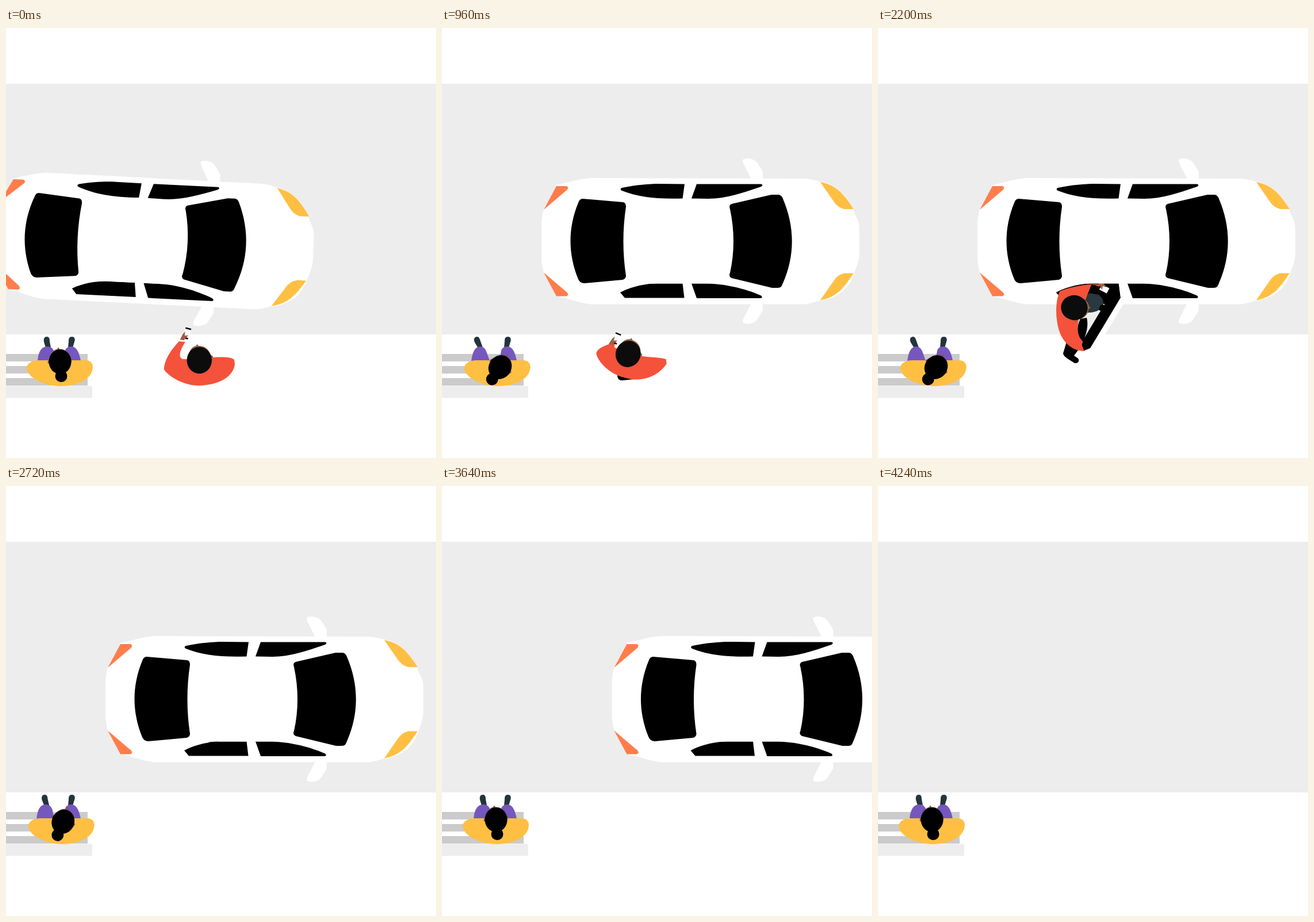
These frames come from a looping animation (748 px wide and 748 px high, 5.32 s). An HTML page:

```html
<!DOCTYPE html>
<html lang="en">
<head>
<meta charset="utf-8">
<title>Pick-up</title>
<style>
  html, body { margin: 0; width: 100%; height: 100%; overflow: hidden; background: #fff; }
  svg { display: block; width: 100vw; height: 100vh; }
</style>
</head>
<body>
<svg viewBox="0 0 748 748">
  <defs>
    <g id="side">
      <path fill="#fff" d="M510 231C510 227 515 227 520 227C530 228 534 232 537 237L545 250V263H525L511 235Z"/>
      <path fill="#ff7d4b" d="M164 316L186 275H203C207 276 207 279 204 282Z"/>
      <path fill="#ffbf43" d="M645 268C672 273 685 287 703 315H688C680 314 674 309 670 304Z"/>
    </g>
  </defs>

  <path fill="#ededed" d="M0 97H748V533H0Z"/>
  <path fill="#cbcbcb" d="M0 567H142V580H0ZM0 588H142V601H0ZM0 609H142V622H0Z"/>
  <path fill="#ededed" d="M0 622.5H148Q150 622.5 150 625V641Q150 643.5 148 643.5H0Z"/>

  <g id="woman">
    <path id="shoeL" fill="#22343c"/>
    <path fill="#22343c" d="M108 556L109 545C109 540 110 537 115 537C119 537 121 541 119 546L116 556Z"/>
    <path id="legL" fill="#7557be"/>
    <path fill="#7557be" d="M130 579C127 563 122 554 114 554C108 554 104 557 103 561L100 579Z"/>
    <path id="torso" fill="#ffbf43" d="M57 578H138C147 578 151 583 151 590C150 612 122 623 95 623C66 623 37 608 36 592C36 583 46 578 57 578Z"/>
    <g id="womanHead">
      <path fill="#8d5034" d="M-17 -8C-15 -17 -9 -21 -5 -22L-3 -25L-1 -22C8 -22 14 -18 17 -8L21 -5L19 3H-20C-23 3 -21 -3 -17 -8Z"/>
      <ellipse rx="19.5" ry="21.5"/>
      <circle cx="2" cy="25" r="10.5"/>
    </g>
  </g>

  <g class="car">
    <path fill="#fff" d="M248 261L620 262C630 263 640 266 648 268C675 272 698 300 705 324C710 333 713 340 713 350V392C713 405 708 415 704 427C695 455 675 470 645 474C635 477 625 480 618 480.5H248C232 480 210 472 190 467L164 425C161 415 160 405 160 395V348C160 335 161 325 164 315L187 273C205 269 230 261 248 261Z"/>
    <use href="#side"/>
    <use href="#side" transform="translate(0 741.5) scale(1 -1)"/>
    <path d="M232 297L302 303C306 304 307 307 307 311C301 350 301 392 307 431C307 434 305 437 301 438L235 444C229 444 226 441 224 437C206 393 206 348 224 304C226 299 228 297 232 297Z"/>
    <path d="M491 306L560 290H573C577 291 579 294 580 297C601 346 601 396 580 444C578 449 577 452 571 452H561L491 435C487 433 486 430 488 426C496 390 496 352 488 315C486 310 488 307 491 306Z"/>
    <path d="M409 271.5L405.5 296.5C360 298 328 294 300 283C297 282 297 279 300 278C325 273 345 271 365 271Z"/>
    <path d="M430 271.5H542C545 272 545 274 542 276C510 287 480 297 450 297L421 296.5Z"/>
    <path d="M421 444.5H440C480 444 515 454 541 465C545 467 544 470 541 470H430Z"/>
    <path d="M297 460C320 448 345 444 365 444.5H405.5L408.5 469.5H305Z"/>
    <path id="opening" d="M297 460C320 448 345 444 365 444.5H405.5L409 470L404 480H322Q314 479 309 473Z"/>
  </g>

  <g id="man">
    <path id="backLeg"/>
    <path id="thigh"/>
    <path id="paper" fill="#fff"/>
    <path id="pants" fill="#2a3840"/>
    <path id="shoe"/>
    <path id="body" fill="#f4523a"/>
    <g id="phone">
      <rect x="-5" y="-9" width="10" height="18" rx="2" fill="#fff"/>
      <path d="M-5 -9.5H5V-7H-5ZM-3 7.5H4V10H-3Z"/>
      <path fill="#9a6146" d="M-9 14L-7 4L-4 -2L-3 5L3 3L1 7L-2 10L-1 13Z"/>
    </g>
    <g id="manHead">
      <path fill="#9a6146" d="M-19 -9C-16 -20 -11 -24 -6 -25L-4 -28L-1 -25C9 -25 16 -20 19 -10L24 -7L21 4H-20Z"/>
      <ellipse rx="21.7" ry="23.2" fill="#0c0c0c"/>
    </g>
  </g>

  <g class="car">
    <path fill="#fff" d="M309 453C325 446 345 444.5 365 444.5H480V300H309Z"/>
    <g id="door">
      <path fill="#fff" d="M414 480H312L303 469H409Z"/>
      <path d="M409 470H308L299 463L305 455L314 452H409Z"/>
      <path id="grip" fill="#9a6146" d="M284 467L294 464L308 470C307 479 300 479 287 472Z"/>
    </g>
  </g>
</svg>

<script>
const LOOP = 5320, STEP = 40;
const el = id => document.getElementById(id);
const cars = document.querySelectorAll('.car');

// Monotone cubic through [time, value] points.
function track(points) {
  const slope = i => (points[i + 1][1] - points[i][1]) / (points[i + 1][0] - points[i][0]);
  const last = points.length - 1;
  const tangent = points.map((_, i) => {
    if (i === 0) return slope(0);
    if (i === last) return slope(last - 1);
    const a = slope(i - 1), b = slope(i);
    return a * b > 0 ? 2 * a * b / (a + b) : 0;
  });
  return t => {
    if (t <= points[0][0]) return points[0][1];
    if (t >= points[last][0]) return points[last][1];
    const i = points.findIndex(p => p[0] > t) - 1;
    const [t0, v0] = points[i], [t1, v1] = points[i + 1];
    const h = t1 - t0, u = (t - t0) / h, w = 1 - u;
    return v0 * w * w * (1 + 2 * u) + v1 * u * u * (3 - 2 * u)
      + h * u * w * (tangent[i] * w - tangent[i + 1] * u);
  };
}

const carX = track([[0, 258], [200, 371.5], [400, 436], [560, 454], [900, 449], [2700, 449],
  [3160, 465], [3640, 571.5], [3920, 749], [4220, 1024], [4280, 1080]]);
const carTilt = track([[0, 2.8], [200, 0.9], [390, 0], [5320, 0]]);
const doorAngle = track([[1060, 0], [1520, 65.7], [1720, 65.7], [2200, 59], [2680, 0], [5320, 0]]);
const manPose = track([[0, 0], [380, 1], [680, 1], [1500, 2], [1720, 2], [2200, 3], [2600, 4], [5320, 4]]);
const womanPose = track([[0, 0], [400, 1], [760, 2], [2480, 2], [3080, 0], [5320, 0]]);

// Blends the numbers of two strings that share one structure.
const NUMBER = /-?\d+(\.\d+)?/g;
function mix(a, b, k) {
  const to = b.match(NUMBER);
  let i = 0;
  return a.replace(NUMBER, n => (+n + (to[i++] - n) * k).toFixed(2));
}
function pose(list, p) {
  const i = Math.max(0, Math.min(list.length - 2, Math.floor(p)));
  return mix(list[i], list[i + 1], Math.min(1, p - i));
}

// Man: holding the phone up, lowered, opening the door, stepping in.
const standing = (a, b, c) => [a, a, b, c];
const manPaths = {
  backLeg: standing(
    'M340 580L325 589L319 600C317 608 321 614 327 613L348 611C353 609 353 601 348 600L344 599L353 598Z',
    'M290 580L275 589L269 600C267 608 271 614 277 613L298 611C303 609 303 601 298 600L294 599L303 598Z',
    'M340 540L328 546L322 566C323 571 327 573 331 576L342 583C350 584 351 577 347 574L341 570L352 555Z'),
  thigh: standing(
    'M338 575C341 585 339 600 331 616C321 608 319 592 327 578Z',
    'M293 555C296 565 294 580 286 590C276 582 274 572 282 558Z',
    'M363 504C366 515 364 530 356 546C346 538 344 522 352 506Z'),
  paper: standing(
    'M300 570L315 565L320 575L305 580Z',
    'M287 502L303 499L313 512L290 518Z',
    'M365 475L380 470L388 480L370 490Z'),
  pants: standing(
    'M325 590L335 582L345 585C350 592 345 605 330 608Z',
    'M290 530L316 513L324 520C325 532 318 545 306 560Z',
    'M352 480L367 461L384 464C402 480 388 497 360 495Z'),
  shoe: standing(
    'M325 595L328 590C330 587 340 587 340 592L338 600Z',
    'M314 518L315 507C315 500 326 500 326 508L324 524Z',
    'M384 490L386 484C388 480 394 480 393 484L388 493Z'),
  body: [
    'M301 545C291 556 275 575 275 594C279 602 305 622 335 622C352 622 372 617 384 608C392 602 398 592 398 584L397 577C392 571 368 572 345 574C335 575 320 576 309 576C300 575 300 564 312 546Z',
    'M294 570C286 576 275 586 275 594C279 602 305 622 335 622C352 622 372 617 384 608C392 602 398 592 398 584L397 577C392 571 368 572 345 574C335 575 320 576 306 576C302 575 302 571 302 567Z',
    'M297 490C285 485 256 478 251 490C243 510 247 545 262 568C275 590 290 602 313 600C335 597 352 591 371 584L370 574C345 576 328 578 308 555C295 540 290 520 287 502C290 500 296 500 300 498Z',
    'M388 447C370 443 335 450 316 458C309 475 308 500 314 523C320 545 335 558 350 561C354 562 357 562 359 562L357 546C345 535 347 520 349 508C352 495 362 470 371 447C375 446 382 448 386 451Z']
};
const manMoves = {
  phone: ['translate(315 531) rotate(15)', 'translate(302.5 556.5) rotate(4)',
    'translate(306.5 495) rotate(70)', 'translate(394 454) rotate(118)'],
  manHead: ['translate(336.3 578) rotate(0)', 'translate(336.3 578) rotate(0)',
    'translate(290 537) rotate(75)', 'translate(341.5 486.5) rotate(98)']
};

const womanPaths = {
  shoeL: ['M69 556L66 546C65 540 67 537 71 537C75 537 76 540 76 545L78 556Z',
    'M68 556L65 546C64 540 66 537 70 537C74 537 75 540 75 545L77 556Z',
    'M63 557L57 547C54 541 57 537 61 537C65 537 66 542 67 545L71 556Z'],
  legL: ['M55 579C56 566 60 554 72 554C78 554 81 557 83 561L88 579Z',
    'M54 579C55 566 59 554 70 554C77 554 80 557 82 563L84 579Z',
    'M51 579C53 563 58 554 66 554C73 554 76 559 78 565L83 579Z']
};
const womanMoves = {
  torso: ['translate(0 0)', 'translate(2.7 0)', 'translate(2.7 0)'],
  womanHead: ['translate(94 580.5) rotate(0)', 'translate(98.5 581.5) rotate(22)',
    'translate(101 590) rotate(38)']
};

function apply(parts, attribute, p) {
  for (const id in parts) el(id).setAttribute(attribute, pose(parts[id], p));
}
const show = (id, on) => { el(id).style.display = on ? '' : 'none'; };

function draw(t) {
  const move = `translate(${carX(t) - 436} 0) rotate(${carTilt(t)} 436 371)`;
  cars.forEach(car => car.setAttribute('transform', move));

  const angle = doorAngle(t);
  show('opening', angle > 0.5);
  show('door', angle > 0.5);
  show('grip', t >= 1060 && t < 1800);
  el('door').setAttribute('transform', `rotate(${-angle} 409 471)`);

  const m = manPose(t), inside = Math.max(0, m - 3);
  show('man', m < 4);
  el('man').setAttribute('transform', `translate(${28 * inside} ${-125 * inside})`);
  apply(manPaths, 'd', Math.min(m, 3));
  apply(manMoves, 'transform', Math.min(m, 3));

  const w = womanPose(t);
  apply(womanPaths, 'd', w);
  apply(womanMoves, 'transform', w);
}

const start = performance.now();
function tick() {
  const t = (performance.now() - start) % LOOP;
  draw(Math.floor(t / STEP) * STEP);
  requestAnimationFrame(tick);
}
tick();
</script>
</body>
</html>
```
